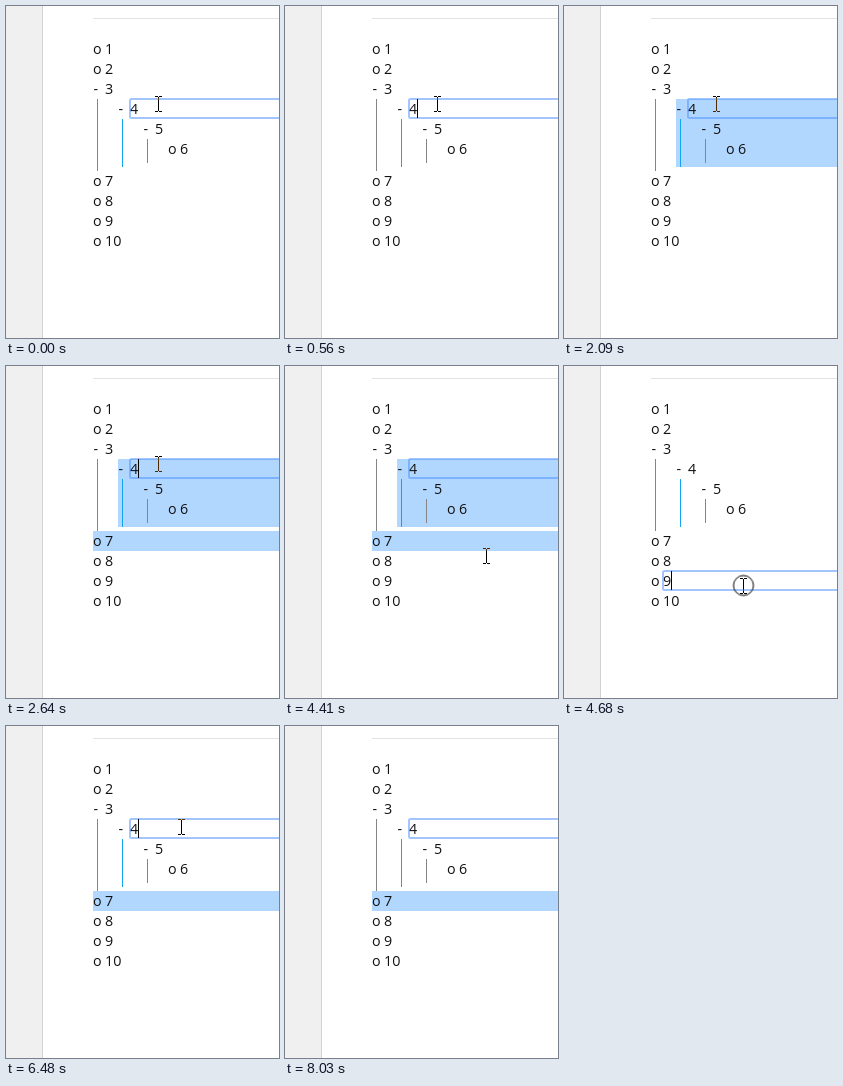
Animation, 273 px wide and 332 px high, one loop 8130 ms. Source, as an HTML page:

```html
<!DOCTYPE html>
<html lang="en">
<head>
<meta charset="utf-8">
<title>Outline selection</title>
<style>
  html, body { margin: 0; width: 100%; height: 100%; overflow: hidden; background: #fff; }
  svg { display: block; width: 273px; height: 332px; background: #fff; isolation: isolate; }
  text { font: 14.3px "Open Sans", "Noto Sans", sans-serif; fill: #111; }

  .branch, .next, .focus, .caret, .beam, .ring, .arrow { animation: 8130ms step-end infinite; }
  .branch { animation-name: branch; }
  .next { animation-name: next; }
  .focus { animation-name: focus; }
  .caret { animation-name: caret; }
  .beam { animation-name: beam; mix-blend-mode: difference; }
  .ring { animation-name: ring; }
  .arrow { animation-name: arrow; }

  @keyframes branch {
    0%, 57.564% { opacity: 0; }
    9.963% { opacity: 1; }
  }
  @keyframes next {
    0%, 57.564% { opacity: 0; }
    32.472%, 79.704%, 100% { opacity: 1; }
  }
  /* focus visits item 9, then returns to item 4 */
  @keyframes focus {
    0%, 67.035%, 100% { transform: translate(124px, 93px); }
    57.564% { transform: translate(99px, 205px); }
  }
  @keyframes caret {
    0%, 13.038%, 25.707%, 38.622%, 51.168%, 63.960%, 73.554%, 86.100%, 98.769%, 100% { opacity: 0; }
    6.888%, 19.188%, 32.472%, 45.018%, 57.564%, 67.035%, 79.704%, 92.250% { opacity: 1; }
  }
  @keyframes beam {
    0% { transform: translate(149px, 90px); }
    48.093% { transform: translate(162px, 101px); }
    51.168% { transform: translate(187px, 138px); }
    54.243% { transform: translate(198px, 182px); }
    57.564% { transform: translate(176px, 212px); }
    60.639% { transform: translate(172px, 186px); }
    63.960% { transform: translate(172px, 96px); }
    67.035% { transform: translate(-50px, 0); }
    70.110% { transform: translate(172px, 93px); }
    92.250% { transform: translate(211px, 237px); }
    95.694%, 100% { transform: translate(-50px, 0); }
  }
  @keyframes ring {
    0%, 60.639%, 70.110%, 100% { transform: translate(-50px, 0); }
    57.564% { transform: translate(179.5px, 219.5px); }
    67.035% { transform: translate(174.5px, 100.5px); }
  }
  @keyframes arrow {
    0%, 70.110%, 100% { opacity: 0; }
    67.035% { opacity: 1; }
  }
</style>
</head>
<body>
<svg viewBox="0 0 273 332">
  <rect width="273" height="332" fill="#fff"/>
  <g shape-rendering="crispEdges">
    <rect width="36" height="332" fill="#f0f0f0"/>
    <rect x="36" width="1" height="332" fill="#d2d2d2"/>
    <rect x="87" y="12" width="186" height="1" fill="#e2e2e2"/>
    <g fill="#b2d7ff">
      <rect class="branch" x="112" y="93" width="161" height="68"/>
      <rect class="next" x="87" y="165" width="186" height="20"/>
    </g>
    <rect x="91" y="93" width="1" height="72" fill="#858585"/>
    <rect x="116" y="113" width="1" height="48" fill="#12a5f4"/>
    <rect x="141" y="133" width="1" height="24" fill="#858585"/>
  </g>

  <g id="rows"></g>

  <g class="focus">
    <rect x="0" y="0" width="200" height="19" rx="1.5" fill="none" stroke="#4d90fe" stroke-opacity=".52" stroke-width="2"/>
    <rect class="caret" x="8" y="0" width="1" height="19" fill="#000" shape-rendering="crispEdges"/>
  </g>

  <circle class="ring" r="10" fill="none" stroke="#000"/>
  <path class="arrow" d="M173.5 99.5v16l3.7-3.5 2.4 5.5 2.4-1-2.4-5.4h5z" fill="#fff" stroke="#000"/>
  <path class="beam" d="M0 0h3v1H0zM4 0h3v1H4zM3 1h1v14H3zM0 15h3v1H0zM4 15h3v1H4z" fill="#fff" shape-rendering="crispEdges"/>
</svg>
<script>
  const rows = document.getElementById("rows");
  const depth = { 4: 1, 5: 2, 6: 3 };

  function addText(x, y, value) {
    const node = document.createElementNS("http://www.w3.org/2000/svg", "text");
    node.setAttribute("x", x);
    node.setAttribute("y", y);
    node.textContent = value;
    rows.append(node);
  }

  for (let n = 1; n <= 10; n++) {
    const x = 87 + 25 * (depth[n] || 0);
    const y = 28 + 20 * n + (n > 6 ? 12 : 0);
    const open = n >= 3 && n <= 5;
    addText(open ? x + 0.6 : x, y, open ? "-" : "o");
    addText(x + 12, y, n);
  }
</script>
</body>
</html>
```
